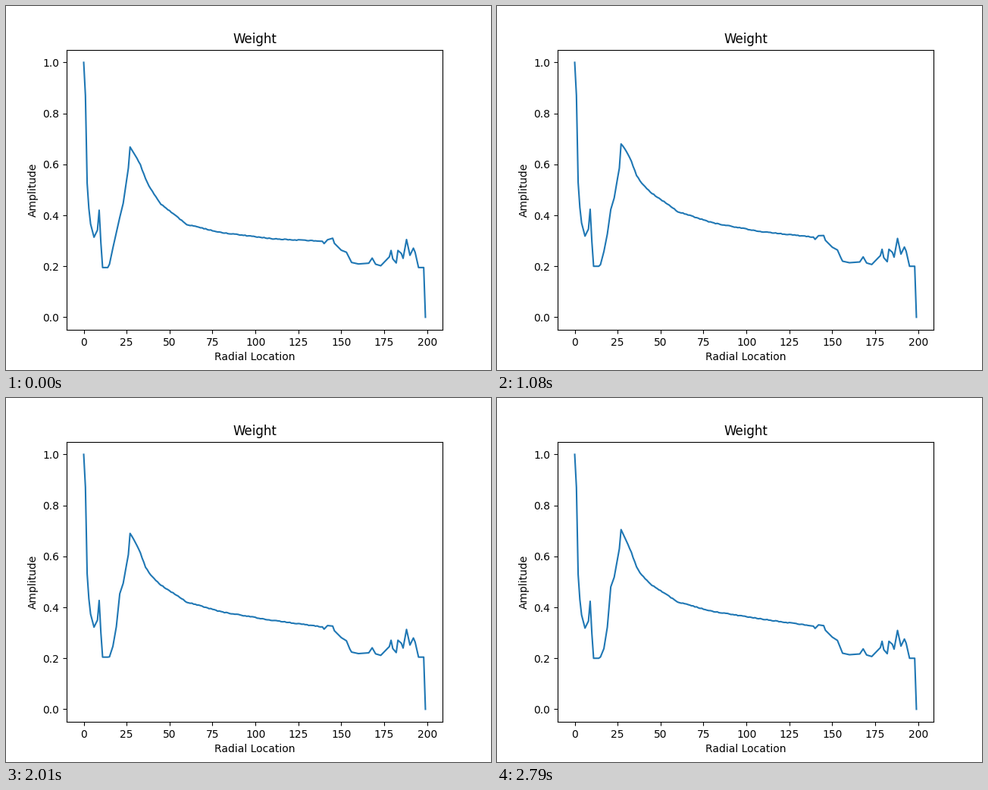
A matplotlib script for the animation above (2.82 s loop, 640 px wide and 480 px high).

```python
import numpy as np
import matplotlib.pyplot as plt
from matplotlib.animation import FuncAnimation

FRAMES, INTERVAL = 94, 30
LOW = 0.195  # floor level the outer shapes are given for

# Key points (x, y): both ends keep their shape while the floor drifts.
HEAD = [(0, 1), (1, .87), (2, .526), (3, .427), (4, .366), (6, .314),
        (8, .342), (9, .42), (10, .292), (11, LOW), (14, LOW)]
TAIL = [(156, .215), (160, .209), (166, .212), (168, .232), (170, .208),
        (173, .202), (178, .237), (179, .262), (180, .229), (182, .213),
        (183, .262), (185, .25), (186, .231), (188, .305), (190, .243),
        (192, .271), (193, .255), (195, LOW), (199, LOW)]

# Key points (x, y at the start, y at the end) of the main hump.
HUMP = [(15, .208, .205), (17, .272, .238), (19, .332, .322),
        (21, .392, .480), (23, .447, .518), (26, .585, .630),
        (27, .668, .705), (30, .635, .661), (33, .598, .615),
        (36, .543, .558), (39, .503, .526), (45, .444, .487),
        (60, .364, .421), (80, .332, .384), (110, .308, .353),
        (139, .298, .326), (140, .289, .317), (142, .304, .331),
        (145, .310, .328), (146, .290, .310), (150, .263, .283),
        (153, .255, .270), (156, .215, .220)]

# Slow drift of the floor and of the hump's top.
TIMES = [0, 12, 36, 50, 67, 78, 93]
FLOOR = [.195, .199, .200, .203, .2045, .203, .200]
TOP = [.668, .690, .680, .684, .690, .713, .705]

x = np.arange(200)
ends = np.interp(x, *zip(*(HEAD + TAIL)))
knots, first, last = zip(*HUMP)
start, finish = np.interp(x, knots, first), np.interp(x, knots, last)

crest = 27
hump = (x >= 15) & (x < 156)
tau = np.interp(x, [30, 45, 60, 110], [.15, .15, .22, .44])
near_top = np.exp(-np.abs(x - crest) / 3)

rng = np.random.default_rng(7)
phase = rng.uniform(0, 2 * np.pi, x.size)
grain = 0.0013 * ((x > 30) & (x < 139))


def settle(t):
    return 1 - np.exp(-(t / tau) ** 1.4)


def weight(frame):
    t = frame / (FRAMES - 1)
    floor = np.interp(frame, TIMES, FLOOR)
    y = 1 - (1 - ends) * (1 - floor) / (1 - LOW)

    # The flank climbs steadily; the decay settles later further out.
    ease = np.where(x < crest, t, settle(t) / settle(1))
    mid = start + (finish - start) * ease
    mid += (np.interp(frame, TIMES, TOP) - mid[crest]) * near_top
    mid += grain * np.sin(phase + 6 * np.pi * t)

    y[hump] = mid[hump]
    y[-1] = 0
    return y


plt.rcParams["font.family"] = "DejaVu Sans"
fig, ax = plt.subplots(figsize=(6.4, 4.8), dpi=100)
line, = ax.plot(x, weight(0), color="#1f77b4", lw=1.5)
ax.set(title="Weight", xlabel="Radial Location", ylabel="Amplitude",
       xlim=(-9.95, 208.95), ylim=(-0.05, 1.05))


def update(frame):
    line.set_ydata(weight(frame))
    return line,


anim = FuncAnimation(fig, update, frames=FRAMES, interval=INTERVAL,
                     repeat=True, repeat_delay=0)
plt.show()
```
